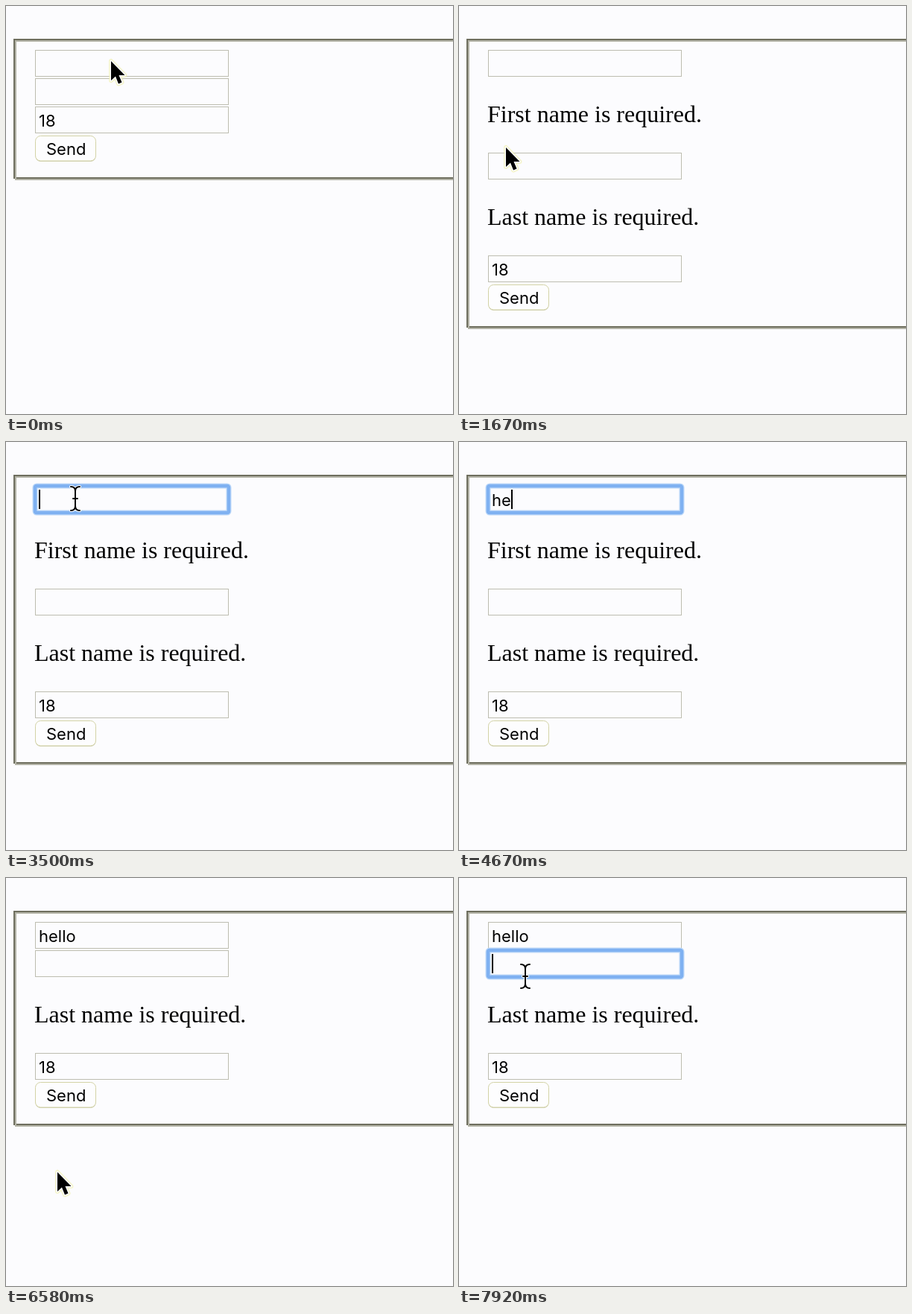
Animation of 600 by 548 pixels, one loop 8 s. Source, as an HTML page:

```html
<!DOCTYPE html>
<html lang="en">
<head>
<meta charset="utf-8">
<title>Form validation</title>
<style>
  html, body { margin: 0; width: 100%; height: 100%; overflow: hidden; background: #fcfcfe; }
  svg { display: block; width: 600px; height: 548px; }
  text { white-space: pre; }
  .ui { font: 22px Inter, Roboto, "Open Sans", sans-serif; }
  .err { font: 32px "Liberation Serif", Times, serif; }
  .box { fill: #fcfcfe; stroke: #bdbdb0; }
  .ring rect { fill: none; }
</style>
</head>
<body>
<svg viewBox="0 0 600 548">
  <g fill="none" stroke-width="2">
    <rect id="outer" x="11" y="45" width="700" stroke="#6e6e5e"/>
    <rect id="inner" x="13" y="47" width="700" stroke="#b3b3a6"/>
  </g>
  <g id="form"></g>
  <g id="button">
    <rect x="39.5" y="1" width="81" height="34" rx="7" fill="#d0d0b4"/>
    <rect x="39.5" y=".5" width="81" height="33.5" rx="7" fill="#fdfdfe" stroke="#d3d3a6"/>
    <text class="ui" x="54" y="26">Send</text>
  </g>
  <g id="ring" class="ring">
    <rect id="glow" stroke="#bcd8f8" stroke-width="7"/>
    <rect id="core" stroke="#7fb1f1" stroke-width="4.5"/>
  </g>
  <rect id="caret" width="2" height="26"/>
  <g id="arrow" stroke-linejoin="round">
    <path id="tip" d="M0 0V26L6 20.5L10 30.5L14.5 28.5L10.5 19H18.5Z" fill="none" stroke="#f1f1a8" stroke-opacity=".6" stroke-width="6"/>
    <use href="#tip" x="0" y="0" style="display:none"/>
    <path d="M0 0V26L6 20.5L10 30.5L14.5 28.5L10.5 19H18.5Z" stroke="#fff" stroke-width="3" paint-order="stroke"/>
  </g>
  <g id="beam" fill="none" stroke-linecap="round">
    <path id="beamEdge" stroke="#fff" stroke-width="4"/>
    <path id="beamInk" stroke="#000" stroke-width="2"/>
  </g>
</svg>
<script>
const LOOP = 8000, FPS = 12, BLINK = 530;
const $ = id => document.getElementById(id);
const set = (el, attrs) => { for (const k in attrs) el.setAttribute(k, attrs[k]); };
const show = (el, on) => { el.style.display = on ? "" : "none"; };
const move = (el, x, y) => set(el, { transform: `translate(${x} ${y})` });

// pointer hot spot: ms, x, y
const path = [
  [0, 141, 74], [80, 141, 74], [250, 118, 79], [750, 118, 79],
  [1250, 63, 190], [1670, 63, 190], [2000, 93, 76], [5500, 93, 76],
  [5860, 51, 520], [6330, 69, 395], [6830, 69, 395], [7250, 88, 147],
  [7500, 88, 147], [7670, 90, 100], [7910, 89, 132]
];
// which field has focus: ms, field index
const focus = [[0, -1], [580, 0], [1410, -1], [2080, 0], [6410, -1], [7660, 1]];
// which errors are shown: ms, first, last
const errors = [[0, 0, 0], [1410, 1, 1], [6410, 0, 1]];
const keys = [4330, 4580, 4750, 4830, 5000];
const word = "hello";
const hidden = [4330, 5490];

const beamPath = "M-6 -16Q0 -16 0 -10V10Q0 16 -6 16M6 -16Q0 -16 0 -10M0 10Q0 16 6 16M-3 0H3";
set($("beamEdge"), { d: beamPath });
set($("beamInk"), { d: beamPath });

function add(parent, tag, attrs, text = "") {
  const el = document.createElementNS("http://www.w3.org/2000/svg", tag);
  set(el, attrs);
  el.textContent = text;
  parent.append(el);
  return el;
}

const fields = ["First name is required.", "Last name is required.", ""].map(msg => {
  const g = add($("form"), "g", {});
  add(g, "rect", { class: "box", x: 39.5, y: 0.5, width: 259, height: 35 });
  return {
    g,
    value: add(g, "text", { class: "ui", x: 44, y: 27 }),
    error: add(g, "text", { class: "err", x: 38, y: 97 }, msg)
  };
});
fields[2].value.textContent = "18";

const current = (table, t) => table.filter(row => row[0] <= t).pop();

function pointAt(t) {
  const i = path.findIndex(p => p[0] > t);
  if (i < 0) return path[path.length - 1].slice(1);
  const [a, b] = [path[i - 1], path[i]];
  const u = (t - a[0]) / (b[0] - a[0]);
  const s = u * u * (3 - 2 * u);
  return [1, 2].map(k => a[k] + (b[k] - a[k]) * s);
}

function layout(t) {
  const [, first, last] = current(errors, t);
  const tops = [59, 97 + 100 * first, 135 + 100 * (first + last)];
  const shown = [first, last, 0];
  fields.forEach((f, i) => {
    move(f.g, 0, tops[i]);
    show(f.error, shown[i]);
  });
  move($("button"), 0, tops[2] + 39);
  const height = tops[2] + 99 - 44;
  set($("outer"), { height: height - 4 });
  set($("inner"), { height: height - 4 });
  return { tops, shown };
}

function drawFocus(t, tops) {
  const [start, i] = current(focus, t);
  show($("ring"), i >= 0);
  show($("caret"), false);
  if (i < 0) return;
  const u = Math.min(1, (t - start + 40) / 220);
  const grow = 4 * (1 - u);
  const rect = {
    x: 39 - grow, y: tops[i] - grow,
    width: 260 + 2 * grow, height: 36 + 2 * grow, rx: 2 + grow
  };
  set($("glow"), rect);
  set($("core"), rect);
  set($("ring"), { opacity: 0.3 + 0.7 * u });

  const typed = i === 0 ? keys.filter(k => k <= t) : [];
  const last = typed.length ? typed[typed.length - 1] : start;
  const text = fields[i].value;
  const width = text.textContent ? text.getComputedTextLength() : 0;
  set($("caret"), { x: Math.round(44 + width), y: tops[i] + 5 });
  show($("caret"), (t - last) % (2 * BLINK) < BLINK);
}

function drawPointer(t, { tops, shown }) {
  const [x, y] = pointAt(t);
  const inField = top => x > 39 && x < 299 && y > top && y < top + 36;
  const inError = (top, i) => shown[i] && x > 38 && x < 326 && y > top + 70 && y < top + 104;
  const overText = t >= 80 && tops.some((top, i) => inField(top) || inError(top, i));
  const visible = t < hidden[0] || t >= hidden[1];
  show($("arrow"), visible && !overText);
  show($("beam"), visible && overText);
  move($("arrow"), x, y);
  move($("beam"), x, y);
}

function draw(t) {
  const form = layout(t);
  fields[0].value.textContent = word.slice(0, keys.filter(k => k <= t).length);
  drawFocus(t, form.tops);
  drawPointer(t, form);
}

const begin = performance.now();
function tick() {
  const t = Math.max(0, performance.now() - begin) % LOOP;
  const step = Math.min(LOOP * FPS / 1000 - 1, Math.floor((t + 4) * FPS / 1000));
  draw(step * 1000 / FPS);
  requestAnimationFrame(tick);
}
tick();
</script>
</body>
</html>
```
